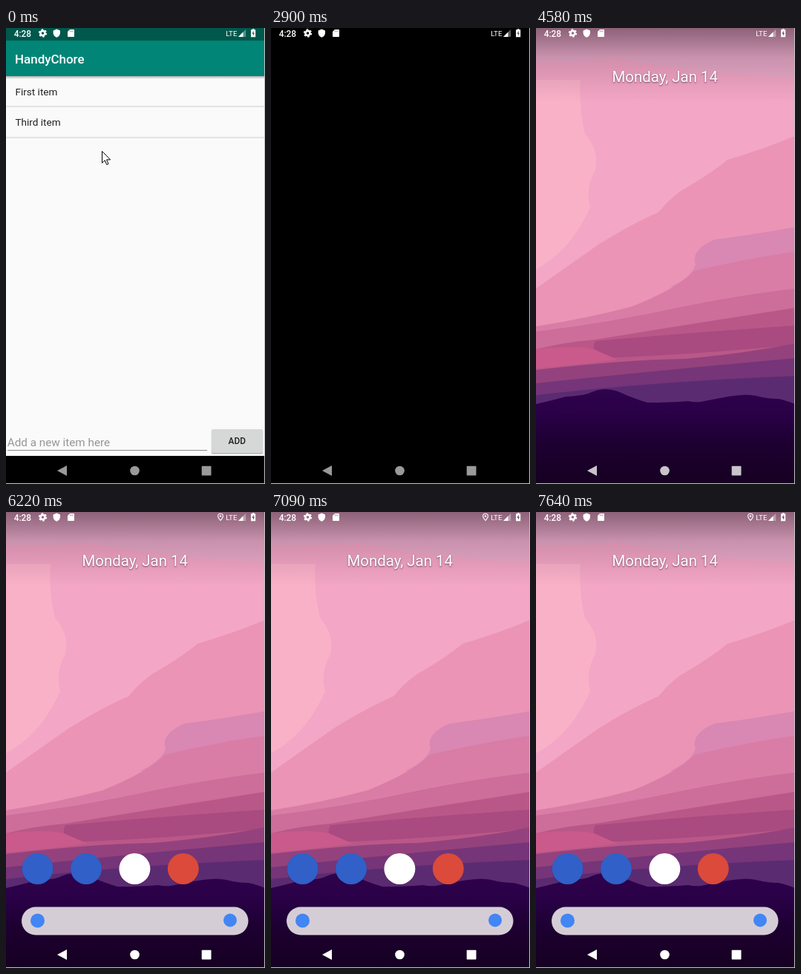
Recreate the animation shown at these times as an HTML page. Size 349x616 px, loop 8000 ms.

```html
<!DOCTYPE html>
<html lang="en">
<head>
<meta charset="utf-8">
<title>Todo list and home screen</title>
<style>
  html, body { margin: 0; width: 100%; height: 100%; overflow: hidden; background: #000; }
  svg { display: block; width: 349px; height: 616px; }
  text { font-family: Roboto, "Open Sans", sans-serif; }
  .mid { font-weight: 500; }
  .item { font-size: 13.57px; fill: #212121; }
  #date { font-size: 20.4px; fill: #fff; text-anchor: middle; text-shadow: 0 1px 2px rgba(50, 20, 50, .65); }
</style>
</head>
<body>
<svg viewBox="0 0 349 616">
  <defs>
    <linearGradient id="sky" gradientUnits="userSpaceOnUse" x1="174" y1="0" x2="216" y2="540"></linearGradient>
    <linearGradient id="ground" x1="0" y1="0" x2="0" y2="1"></linearGradient>
    <linearGradient id="dim" x1="0" y1="0" x2="0" y2="1">
      <stop stop-color="#301828" stop-opacity=".5"/>
      <stop offset=".4" stop-color="#301828" stop-opacity=".17"/>
      <stop offset="1" stop-color="#301828" stop-opacity="0"/>
    </linearGradient>
    <linearGradient id="dimLow" x1="0" y1="0" x2="0" y2="1">
      <stop stop-color="#100010" stop-opacity="0"/>
      <stop offset="1" stop-color="#100010" stop-opacity=".45"/>
    </linearGradient>
    <linearGradient id="barShade" x1="0" y1="0" x2="0" y2="1">
      <stop stop-color="#000" stop-opacity=".3"/>
      <stop offset="1" stop-color="#000" stop-opacity="0"/>
    </linearGradient>
    <path id="hills" d="M0 508Q22 503 40 498Q58 497 70 494Q82 488 92 488Q104 488 113 492Q130 500 150 506Q180 506 205 504Q214 506 222 505Q245 500 265 497Q285 494 297 497Q312 501 327 501Q340 504 349 508V616H0Z" fill="url(#ground)"/>
  </defs>

  <rect width="349" height="616"/>

  <g id="app">
    <rect width="349" height="578" fill="#fafafa"/>
    <rect y="65" width="349" height="4" fill="url(#barShade)"/>
    <rect width="349" height="65" fill="#008577"/>
    <rect width="349" height="17" fill="#00574b"/>
    <text class="mid" x="12" y="47.5" font-size="16.97" fill="#fff">HandyChore</text>
    <text class="item" x="12.4" y="90.5">First item</text>
    <text class="item" x="12.4" y="132.4">Third item</text>
    <path d="M0 106H349M0 148H349" stroke="#dcdcdc" stroke-width="1.3"/>
    <text x="1.7" y="564.5" font-size="15.27" fill="#969696">Add a new item here</text>
    <path d="M2 570.5H271" stroke="#888"/>
    <rect x="276.5" y="543" width="70" height="33" rx="2" fill="#000" opacity=".12"/>
    <rect x="277" y="543" width="69" height="32" rx="2" fill="#000" opacity=".2"/>
    <rect x="277" y="542" width="69" height="32" rx="2" fill="#d6d7d7"/>
    <text class="mid" x="311.3" y="562.3" font-size="11.88" fill="#212121" text-anchor="middle">ADD</text>
  </g>

  <g id="dusk">
    <rect width="349" height="616" fill="url(#sky)"/>
    <path d="M0 122Q40 126 70 143Q88 185 76 220Q58 270 0 312Z" fill="#fdb7c6" opacity=".65"/>
    <path d="M68 78Q85 62 130 57Q220 40 349 48V96Q260 100 205 124Q130 110 66 134Z" fill="#f2aacf" opacity=".5"/>
    <path d="M66 140Q120 150 153 184Q148 220 60 268Q0 300 0 330V300Q80 240 82 185Z" fill="#f8abc2" opacity=".5"/>
    <path d="M349 98Q250 108 204 130Q184 148 190 178Q180 205 152 228Q250 200 349 146Z" fill="#f09fbf" opacity=".6"/>
    <path d="M349 236Q280 250 190 282Q125 300 118 328Q150 342 216 322L349 296Z" fill="#d68abb" opacity=".55"/>
    <path d="M349 272Q280 276 224 294Q210 306 216 326Q290 338 349 318Z" fill="#d486b3" opacity=".6"/>
    <path d="M0 440Q100 428 190 436Q120 462 0 466Z" fill="#cf568a" opacity=".6"/>
    <use href="#hills"/>
    <g id="specks" fill="#68487c"></g>
    <path d="M112 527Q138 523 160 517Q140 525 112 527Z" fill="#4a2762"/>
  </g>

  <g id="home">
    <g id="bands"></g>
    <use href="#hills"/>
    <rect width="349" height="100" fill="url(#dim)"/>
    <rect y="520" width="349" height="96" fill="url(#dimLow)"/>
    <text id="date" x="173.7" y="73.3">Monday, Jan 14</text>
  </g>

  <g id="dock">
    <rect x="21" y="534.5" width="305.5" height="38" rx="19" fill="#100018" opacity=".4"/>
    <rect x="21" y="533.5" width="305.5" height="38" rx="19" fill="#d5cdd6"/>
    <circle cx="42.5" cy="552" r="9.5" fill="#4285f4"/>
    <circle cx="302" cy="551.5" r="9" fill="#4285f4"/>
    <g id="apps"></g>
  </g>

  <g fill="#fff">
    <text class="mid" x="10.7" y="11.6" font-size="11.88">4:28</text>
    <circle cx="49.5" cy="7" r="3.1" fill="none" stroke="#fff" stroke-width="2.6"/>
    <circle cx="49.5" cy="7" r="4.9" fill="none" stroke="#fff" stroke-width="1.6" stroke-dasharray="2.57 2.56"/>
    <path d="M68.3 1.5L73 3.4V6.7Q72.6 11 68.3 12.7Q64 11 63.6 6.7V3.4Z"/>
    <path d="M86 2H91.2Q92 2 92 2.8V11.2Q92 12 91.2 12H83.8Q83 12 83 11.2V5Z"/>
    <path d="M86.3 3.4V5.3M88.2 3.4V5.3M90.1 3.4V5.3" stroke="#777" stroke-width=".8"/>
    <text x="296.2" y="10.6" font-size="9.7" textLength="auto">LTE</text>
    <path d="M313 12L323.2 1.8V12Z" opacity=".35"/>
    <path d="M313 12L319.5 5.5V12Z"/>
    <path d="M332 1.2H334.4V2.3H336.2V12.2H330V2.3H332Z"/>
    <path d="M333.7 3.8L331.4 7.8H332.9V10.8L335 6.7H333.7Z" fill="#555"/>
    <path id="pin" fill-rule="evenodd" d="M289 1.7C291.4 1.7 293 3.4 293 5.6C293 8.3 289 12.4 289 12.4S285 8.3 285 5.6C285 3.4 286.6 1.7 289 1.7ZM289 2.8C287.2 2.8 286.1 4.1 286.1 5.6C286.1 7.3 289 10.7 289 10.7S291.9 7.3 291.9 5.6C291.9 4.1 290.8 2.8 289 2.8ZM289 4.2A1.4 1.4 0 1 1 288.9 4.2Z"/>
  </g>

  <g id="nav">
    <path d="M69 598L82 591V605Z"/>
    <circle cx="173.5" cy="598" r="6.3"/>
    <rect x="263.7" y="591.8" width="12.8" height="12.8" rx=".8"/>
  </g>

  <path id="cursor" d="M129.5 166.5V182.3L133.2 178.8L135.7 184.6L138 183.6L135.5 177.9H140.6Z" fill="#fff" stroke="#000"/>
  <path d="M348.5 0V616" stroke="#c2c2c2"/>
  <path d="M0 615.5H349" stroke="#c2c2c2"/>
</svg>

<script>
const LOOP = 8000;
const $ = id => document.getElementById(id);

function add(parent, tag, attrs) {
  const el = document.createElementNS("http://www.w3.org/2000/svg", tag);
  for (const key in attrs) el.setAttribute(key, attrs[key]);
  parent.append(el);
}

const addStops = (id, stops) => stops.forEach(([offset, color]) =>
  add($(id), "stop", { offset, "stop-color": color }));

addStops("sky", [
  [0, "#efb2d3"], [.12, "#f2adcd"], [.24, "#f4a8c5"], [.36, "#f1a2c0"],
  [.48, "#e79cbc"], [.58, "#e092b4"], [.66, "#d582a8"], [.73, "#c26f9a"],
  [.79, "#ac5388"], [.84, "#a84680"], [.88, "#843c7c"], [.94, "#60307a"], [1, "#4c2468"]
]);
addStops("ground", [[0, "#2f024d"], [.3, "#290046"], [.55, "#21003a"], [1, "#1b0030"]]);

// Sky layers, each painted over the one above it.
const low = "V616H0Z";
[
  ["#e9abc9", "M0 0H349" + low],
  ["#f3a6c5", "M0 46Q60 47 110 41Q220 62 349 68" + low],
  ["#f9b1c8", "M0 70H60Q57 105 66 143Q86 166 80 192Q66 216 73 242Q48 300 0 326Z"],
  ["#eb94b6", "M0 352Q45 320 85 292Q130 264 165 249Q185 224 209 212Q240 193 258 178Q300 166 349 146" + low],
  ["#d987b3", "M349 269Q300 278 240 286Q208 300 215 320Q208 338 180 350L349 330Z"],
  ["#d97da6", "M0 403Q70 392 130 376Q190 352 214 328Q280 312 349 302" + low],
  ["#cd6d9a", "M0 410Q100 398 200 376Q280 360 349 352" + low],
  ["#b95888", "M0 434Q40 424 80 421Q220 398 349 378" + low],
  ["#a94a80", "M349 402Q200 412 80 423Q72 438 90 446Q230 440 349 428Z"],
  ["#c95a8b", "M0 434Q50 428 78 434L110 448Q50 456 0 460Z"],
  ["#94427d", "M0 462Q120 448 200 447Q280 440 349 426" + low],
  ["#753578", "M0 480Q150 464 349 446" + low],
  ["#5b2b72", "M0 496Q150 478 349 470" + low]
].forEach(([fill, d]) => add($("bands"), "path", { fill, d }));

["#3060c8", "#3060c8", "#fff", "#db4a3a"].forEach((fill, i) => {
  const cx = 42.6 + i * 65.4;
  add($("apps"), "circle", { cx, cy: 482.8, r: 21.2, fill: "#200030", opacity: .25 });
  add($("apps"), "circle", { cx, cy: 482, r: 21, fill });
});

let seed = 7;
const random = () => (seed = seed * 16807 % 2147483647) / 2147483647;
for (let i = 0; i < 65; i++) {
  const x = 50 + 65 * random();
  add($("specks"), "rect", {
    x, y: 497 + 32 * random(), width: 1, height: .7, opacity: .3 + .5 * random()
  });
}

// Visible parts from each time on, with the colour of the navigation keys.
const steps = [
  [0, "app cursor", "#9a9a9a"],
  [310, "app", "#9a9a9a"],
  [2900, "", "#9a9a9a"],
  [3870, "dusk", "#aca4b0"],
  [4580, "home", "#c9c4cc"],
  [5390, "home", "#eeecef"],
  [5940, "home dock", "#fff"],
  [6220, "home dock pin", "#fff"]
];
const parts = ["app", "cursor", "dusk", "home", "dock", "pin"];

function draw(now) {
  const t = now % LOOP;
  const [, shown, keys] = steps.filter(step => step[0] <= t).pop();
  const on = shown.split(" ");
  parts.forEach(id => $(id).style.display = on.includes(id) ? "" : "none");
  $("nav").setAttribute("fill", keys);
}

const start = performance.now();
function tick() {
  draw(performance.now() - start);
  requestAnimationFrame(tick);
}
tick();
</script>
</body>
</html>
```
